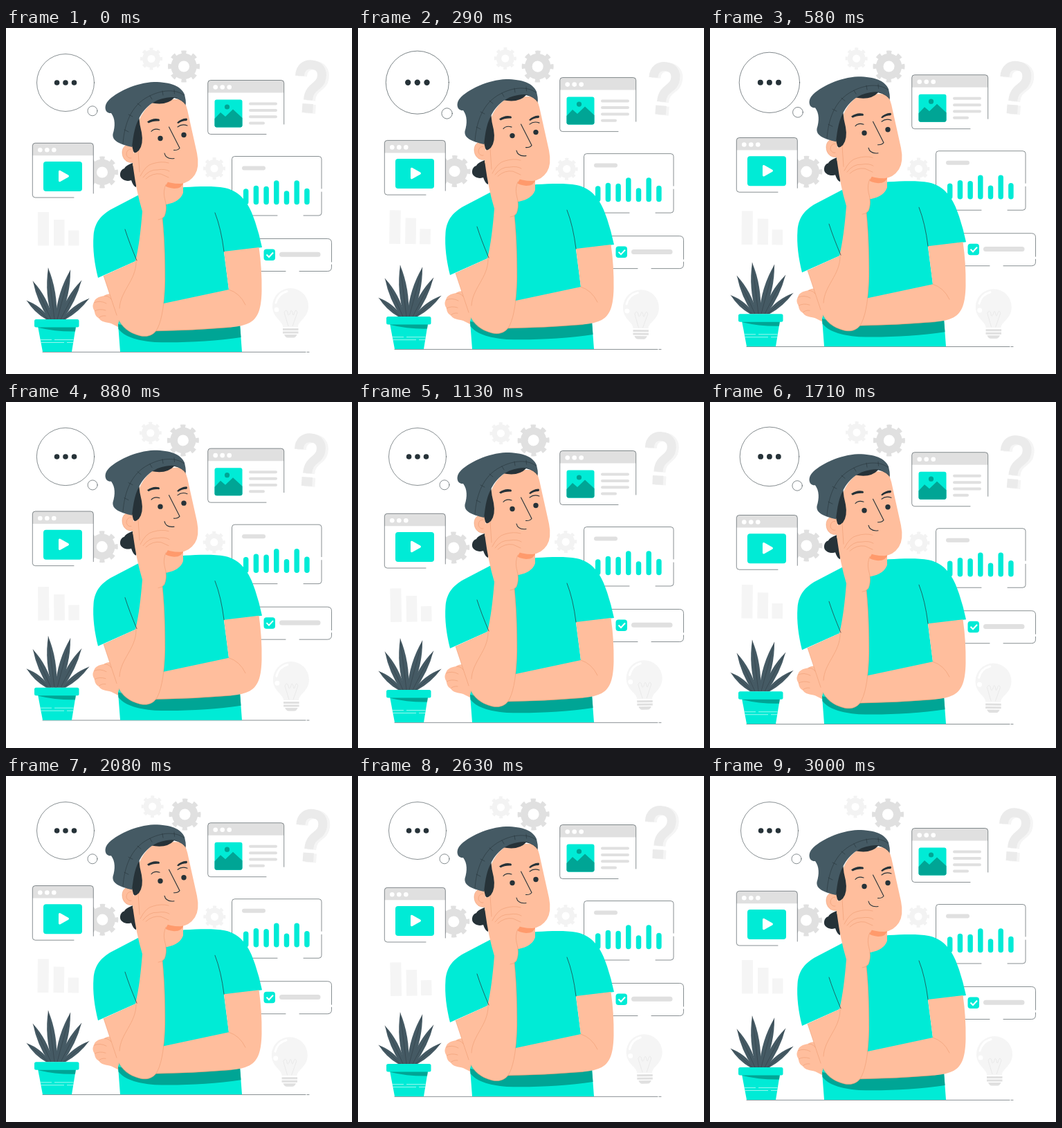
An HTML page that plays this animation: 500x500 px, repeating every 3.04 s.

```html
<!DOCTYPE html>
<html lang="en">
<head>
<meta charset="utf-8">
<title>Thinking</title>
<style>
  html, body { margin: 0; height: 100%; overflow: hidden; background: #fff; }
  svg { display: block; width: 100vw; height: 100vh; }
  .teal { fill: #00ebd6; }
  .deep { fill: #00a595; }
  .skin { fill: #ffbe9d; }
  .ink { fill: #263238; }
  .slate { fill: #455a64; }
  .grey { fill: #e0e0e0; }
  .pale { fill: #f5f5f5; }
  .white { fill: #fff; }
  .line, .fold, .bar { fill: none; stroke-linecap: round; stroke-linejoin: round; }
  .line { stroke: #263238; stroke-width: .55; }
  .fold { stroke: #eb996e; stroke-width: .55; }
  .bar { stroke: #e0e0e0; stroke-width: 4; }
</style>
</head>
<body>
<svg viewBox="0 0 500 500">
  <g id="back">
    <g id="gears"></g>
    <path class="pale" d="M46 266h16v48.500h-16zM69 277h15.500v37.500h-15.500zM90 292.500h15.500v22h-15.500z"/>
    <g fill="none" stroke-width="13">
      <path id="query" d="M424.500 69C425 57 433 52 442 53C453 54 458 62 456 72C454 86 438 83 436.500 104M428 115.500L443.500 116.500"/>
    </g>
    <path class="pale" d="M400 432C400 423 385 419 385 402A26 26 0 0 1 437 402C437 419 422 423 422 432Z"/>
    <path class="grey" d="M400 434h22.500v3h-22.500zM400 438.500h22.500v3h-22.500zM402 443h18.500q-2 4.500-5 4.500h-8.500q-3 0-5-4.500z"/>
    <path fill="none" stroke="#e6e6e6" stroke-width=".8" d="M408 431L402 411Q405 405 407 411Q408 419 411 411Q412 405 414 411Q415 419 417 411Q419 405 421 411L414 431"/>
    <path fill="none" stroke="#fff" stroke-width="3" stroke-linecap="round" d="M390 397Q393 384 406 380.500"/>
    <circle class="white" cx="391" cy="407" r="3.500"/>
  </g>

  <g id="bubble">
    <circle class="line" cx="86" cy="79" r="41.500"/>
    <circle class="line" cx="125" cy="119.800" r="7"/>
    <path stroke="#263238" stroke-width="7.600" stroke-linecap="round" d="M73.600 79h0M86 79h0M98.500 79h0"/>
  </g>

  <g id="front">
    <path class="line" d="M53 468.300H433M435 468.300H438"/>
    <g id="cards"></g>

    <rect class="teal" x="54" y="193" width="56" height="43" rx="4"/>
    <path class="white" d="M76 207.500Q76 205 78.500 206L90 212.500Q92 214 90 215.500L78.500 222Q76 223 76 220.500Z"/>

    <rect class="teal" x="301.500" y="103.500" width="40" height="40" rx="3"/>
    <path class="deep" d="M301.500 131L310 122L317 128L328 117.500L341.500 130V140.500Q341.500 143.500 338.500 143.500H304.500Q301.500 143.500 301.500 140.500Z"/>
    <circle class="deep" cx="319.500" cy="114" r="3.600"/>
    <path class="bar" d="M353 109.500H390M353 119H390M353 128.300H390M353 137.600H372"/>

    <path class="bar" style="stroke-width:6" d="M344 202.500H372"/>
    <path id="chart" class="bar" style="stroke:#00ebd6;stroke-width:7.500"/>

    <rect class="teal" x="372.500" y="319.500" width="16.500" height="16.500" rx="4"/>
    <path fill="none" stroke="#fff" stroke-width="2" d="M376.500 327.500L380 331L386 324.500"/>
    <path class="bar" style="stroke-width:7" d="M398.500 327.300H451"/>

    <g id="leaves"></g>
    <path class="teal" d="M46 431H101L95 468H53Z"/>
    <path class="deep" d="M46.500 432H100.800L100 438.500Q72 439 47 433Z"/>
    <rect class="teal" x="41" y="421" width="64.500" height="11.500" rx="2.500"/>
    <path fill="none" stroke="#fff" stroke-width=".6" d="M50 450.500H66M70 450.500H97.500M50.500 454.500H84M88 454.500H97"/>

    <!-- far hand, bun, torso -->
    <path class="skin" d="M163 389C153 383 147 383 142 387C134 388 128 391 127 397C124 401 126 406 128 409C128 414 131 418 134 419C137 425 145 425 152 427L172 437Z"/>
    <path class="fold" d="M127 397Q136 393 145 398M128 409Q135 405 144 408M134 419Q138 415 144 416M142 387Q149 387 152 392"/>
    <path class="ink" d="M183 195C176 198 172 200 171 203C164 205 163 215 168 218C173 222 179 221 181 220Q184 229 188 230L190 200Z"/>
    <path class="teal" d="M133 361C128 341 125 320 126.500 300C128 279 140 269 152 262L196 239L258 230C279 229 300 228 316 231C340 236 352 255 360 280Q366 298 370 317L315 324L322 378L338 428L341 468H165L162 428L187 337Z"/>
    <path class="deep" d="M162 428L200 434L338 428L339.500 447C300 453 255 455 215 454C188 452 170 445 162.500 435Z"/>

    <!-- neck and face -->
    <path class="skin" d="M212 205L256 222V238Q252 251 232 255L205 240Z"/>
    <path fill="#ff9a6c" d="M228 222L257 222Q255 232 243 232Q233 231 228 227Z"/>
    <path class="skin" d="M187 150Q195 115 220 103H255Q261 110 264 127L276 181Q280 201 273 212Q265 224 252 225Q236 225 225 219L205 240L183 198Z"/>
    <path class="skin" d="M184 171C177 165 168 170 168 180C168 190 176 196 184 194Z"/>
    <path class="fold" d="M184 171C177 165 168 170 168 180C168 190 176 196 183 194M181 175Q174 175 174 183Q176 189 181 188"/>
    <path class="ink" d="M182 170L181 152L192 127Q193 140 196 151Q199 168 192 177Q186 183 184 178Z"/>
    <path class="ink" d="M209 108Q232 113 243 101Q256 104 260 112L255 97L225 95Z"/>
    <path class="slate" d="M182 172C164 168 153 163 154.500 153C158 142 158 131 152 123C143 124 141 113 147 106C158 93 188 79 214 78C238 78 253 84 258 96Q260 104 260 110C252 103 246 100 240 100C218 101 206 110 196 124C186 139 184 155 182 172Z"/>
    <path class="line" d="M169 167C171 140 180 112 206 99C225 89 245 88 257 97M171 147L177 150M177 125L183 128M190 109L195 113M208 98L211 103M226 91L227 97M243 89L243.500 95"/>
    <path class="ink" d="M204 135.500Q212 129.500 221 131.500Q223 133.500 221 134.500Q212 134 206 137.500ZM247 137Q252 131 261 130.500Q263 132 261 134Q254 134 249 138Z"/>
    <circle class="ink" cx="223" cy="159.500" r="3.700"/>
    <circle class="ink" cx="257" cy="154.500" r="3.700"/>
    <path class="line" style="stroke-width:1.100" d="M210 149.500Q214 144.500 222 147M248 143Q254 138 262 141M235.500 143L251 173.500Q248 177 242.500 176.500M229 181Q231 190 243 188.500"/>

    <!-- folded arm -->
    <path class="skin" d="M315 323L365.500 317Q370 348 369.500 380C369 404 365 419 352 426Q342 431 325 432.500Q270 437 212 438L190 430L228 398L322 378Z"/>
    <path class="fold" d="M322 378Q338 383 346 400M212 438Q270 437 325 432.500"/>

    <!-- raised arm and hand -->
    <path class="skin" d="M141 358L187 337C192 317 195 290 197 265C191 245 187 225 184 203L181 181Q186 183 191 178L193 206Q200 196 208 194L232 191Q238 193 236 197L238 207Q239 213 236 218L233 224Q229 230 228 238C230 248 234 260 229 272L226 275C229 300 230 340 230 365C229 395 226 420 219 434C213 446 201 448 188 443C173 438 165 428 160 415Z"/>
    <path class="fold" d="M191 178L193 208M194 214Q202 198 212 196Q225 192 235 195M198 216Q207 204 219 205Q230 203 236 207M202 218Q212 209 224 211L235 216M231 226Q227 235 229 245Q234 262 229 272Q225 277 220 277M226 275C230 315 230 350 229.500 370C229 395 226 420 219 434C213 446 201 448 188 443Q170 437 163 423M188 338C188 365 165 380 164 405M141 358L160 415"/>
    <path class="line" style="stroke-width:.7" d="M172 291Q178 310 189 336M302 267Q311 290 315 323"/>
  </g>
</svg>

<script>
const el = id => document.getElementById(id);

// Gears: a ring plus a dashed circle for eight teeth
const gear = (x, y, r, color) => `<g fill="none" stroke="${color}">
  <circle cx="${x}" cy="${y}" r="${r * .58}" stroke-width="${r * .46}"/>
  <circle cx="${x}" cy="${y}" r="${r * .88}" stroke-width="${r * .24}"
    pathLength="16" stroke-dasharray=".9 1.1" stroke-dashoffset=".45"/></g>`;
el('gears').innerHTML =
  gear(210, 44.5, 16, '#f3f3f3') + gear(257, 55.5, 23, '#e0e0e0') +
  gear(139, 208.5, 23, '#e0e0e0') + gear(301, 203, 16, '#f3f3f3');

// Question mark: a paler copy behind gives it depth
const query = el('query');
const depth = query.cloneNode();
depth.removeAttribute('id');
depth.setAttribute('transform', 'translate(4 1)');
depth.setAttribute('stroke', '#f5f5f5');
query.setAttribute('stroke', '#ebebeb');
query.before(depth);

// Cards: white panels whose outline breaks off at the lower right
function card(x, y, w, h, r, bottom, right, extra = '') {
  const top = `M${x} ${y + 18}V${y + r}q0 ${-r} ${r} ${-r}H${x + w - r}q${r} 0 ${r} ${r}V${y + 18}Z`;
  const dots = [11, 21, 31].map(d =>
    `<circle class="white" cx="${x + d}" cy="${y + 10}" r="3.300"/>`).join('');
  return `<rect class="white" x="${x}" y="${y}" width="${w}" height="${h}" rx="${r}"/>` +
    (extra ? '' : `<path class="grey" d="${top}"/>${dots}`) +
    `<path class="line" d="M${bottom} ${y + h}H${x + r}q${-r} 0 ${-r} ${-r}V${y + r}q0 ${-r} ${r} ${-r}
      H${x + w - r}q${r} 0 ${r} ${r}V${right}${extra}"/>`;
}
el('cards').innerHTML =
  card(38.3, 166.3, 88, 78.7, 4, 98, 239) +
  card(291.7, 75.5, 110, 78, 4, 376, 139) +
  card(326.5, 185.5, 129.5, 85.5, 4, 392, 232, 'M456 237V267q0 4-4 4H430') +
  card(350, 304.5, 120.5, 47, 6, 404, 338, 'M470.500 342V345.500q0 6-6 6H424');

el('chart').setAttribute('d', [236, 231.5, 232.5, 224, 239, 224, 235.5]
  .map((y, i) => `M${346.7 + i * 14.7} ${y}V251.500`).join(''));

// Leaves: base x, tip, width, sideways bow
const leaf = ([bx, x, y, w, bow]) => {
  const by = 421, dx = x - bx, dy = y - by, len = Math.hypot(dx, dy);
  const ctrl = k => `${bx + dx * .52 - dy / len * k} ${by + dy * .52 + dx / len * k}`;
  return `<path class="slate" d="M${bx - 3} ${by}Q${ctrl(bow - w)} ${x} ${y}Q${ctrl(bow + w)} ${bx + 3} ${by}Z"/>
    <path class="line" style="stroke-width:.4" d="M${bx} ${by}Q${ctrl(bow)} ${x} ${y}"/>`;
};
el('leaves').innerHTML = [
  [61, 30, 394, 7, 1], [83, 120, 391, 7, -1], [65, 39, 366, 8.5, 1],
  [79, 109, 365, 8.5, -1], [70, 61, 347, 10, 0], [74, 93, 350, 10, 0]
].map(leaf).join('');

// Motion, stepped at 24 pictures per second
const beats = [[0, 1], [.1, 1.1], [.3, 1], [.4, 1], [.5, 1.1], [.6, 1], [1, 1]];
function beat(p) {
  const i = beats.findIndex(b => b[0] > p);
  const [a, u] = beats[i - 1], [b, v] = beats[i];
  return u + (v - u) * (p - a) / (b - a);
}
const about = (x, y, move) => `translate(${x} ${y}) ${move} translate(${-x} ${-y})`;

function draw(ms) {
  const s = Math.floor((ms % 3040 + 5) * .024) / 24;
  const p = s / 1.5 % 1;
  const rise = 10 * (1 - Math.abs(2 * p - 1));
  const sway = p < .25 ? 4 * p : p < .75 ? 2 - 4 * p : 4 * p - 4;
  el('front').setAttribute('transform', `translate(0 ${-rise})`);
  el('back').setAttribute('transform', `rotate(${sway} 250 250)`);
  el('bubble').setAttribute('transform', about(88, 82, `scale(${beat(s / 3 % 1)})`));
}

const start = performance.now();
(function tick() {
  draw(performance.now() - start);
  requestAnimationFrame(tick);
})();
</script>
</body>
</html>
```
